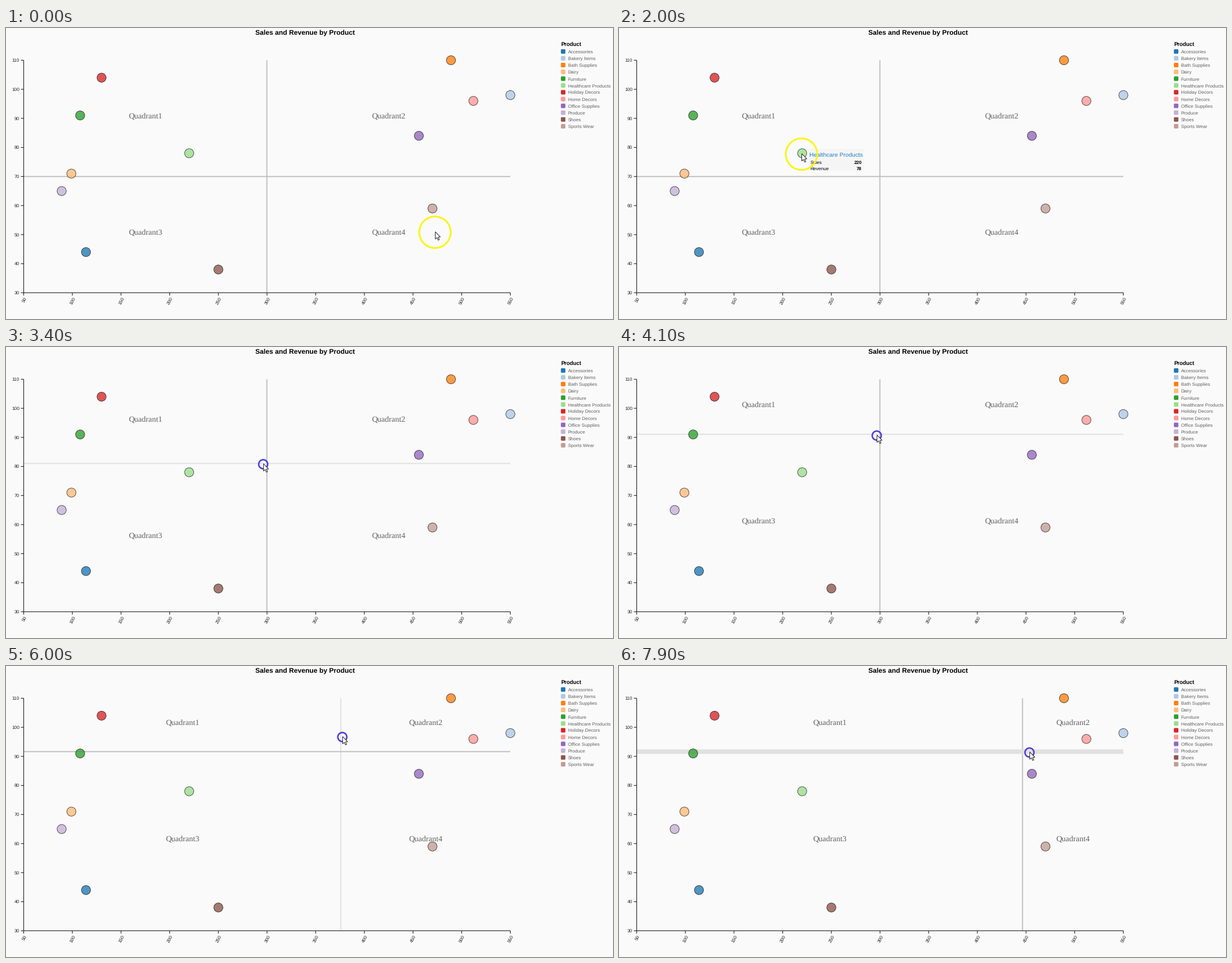
A matplotlib script that plays this animation: 1081x518 px, repeating every 8 s.

```python
import numpy as np
import matplotlib.pyplot as plt
from matplotlib.animation import FuncAnimation
from matplotlib.patches import Circle, FancyBboxPatch, Polygon, Rectangle

plt.rcParams["text.hinting"] = "none"

W, H, DPI = 1081, 518, 100
FRAMES, STEP = 80, 100
PX = 72 / DPI
LEFT, RIGHT, TOP, BOTTOM = 31.5, 898.2, 57.4, 471.3
INK, TEXT, GREY, PALE = "#222222", "#606060", "#bdbdbd", "#e0e0e0"
YELLOW, BLUE = "#fbf50c", "#4b40dc"

PRODUCTS = [
    ("Accessories", 114, 44), ("Bakery Items", 550, 98),
    ("Bath Supplies", 489, 110), ("Dairy", 99, 71),
    ("Furniture", 108, 91), ("Healthcare Products", 220, 78),
    ("Holiday Decors", 130, 104), ("Home Decors", 512, 96),
    ("Office Supplies", 456, 84), ("Produce", 89, 65),
    ("Shoes", 250, 38), ("Sports Wear", 470, 59),
]
COLORS = plt.get_cmap("tab20").colors

# Pointer stops: arrive, leave, x, y
STOPS = [
    (0, 0, 764, 363), (4, 5, 905, 118), (7, 7, 520, 68), (9, 11, 168, 88),
    (19, 20, 325, 224), (24, 24, 410, 335), (27, 30, 457, 266.4),
    (43, 48, 459, 154.4), (50, 55, 465, 139), (71, 74, 719, 114),
    (78, FRAMES, 731, 153.4),
]
# Button down and up
H_DRAG, V_DRAG, LAST_PRESS = (30, 48), (55, 73), (78, FRAMES)
LAG = .1


def sx(v):
    return LEFT + (v - 50) / 500 * (RIGHT - LEFT)


def sy(v):
    return BOTTOM - (v - 30) / 80 * (BOTTOM - TOP)


POINTS = np.array([(sx(s), sy(r)) for _, s, r in PRODUCTS])


def pointer(i):
    """Rest at each stop, then ease out towards the next one."""
    for (_, leave, *a), (arrive, _, *b) in zip(STOPS, STOPS[1:]):
        if i < arrive:
            t = max(0, (i - leave) / (arrive - leave))
            return np.array(a) + (1 - (1 - t) ** 2) * np.subtract(b, a)
    return np.array(STOPS[-1][2:], float)


def dragged(i, span):
    return pointer(np.clip(i - LAG, *span))


def inside(i, span):
    return span[0] <= i < span[1]


fig = plt.figure(figsize=((W + .001) / DPI, (H + .001) / DPI), dpi=DPI,
                 facecolor="#fafafa")
ax = fig.add_axes([0, 0, 1, 1])
ax.set_xlim(0, W)
ax.set_ylim(H, 0)
ax.axis("off")


def label(x, y, s, size, color=INK, font="Liberation Sans", **kw):
    return ax.text(x, y, s, fontsize=size * PX, color=color, family=font, **kw)


def line(xs, ys, color=INK, width=1.15, z=3):
    return ax.plot(xs, ys, color=color, lw=width * PX, zorder=z, snap=False,
                   solid_capstyle="butt")[0]


def draw_axes():
    line([LEFT, LEFT], [TOP, BOTTOM + .5])
    line([LEFT, RIGHT], [BOTTOM, BOTTOM])
    for v in range(30, 111, 10):
        line([LEFT - 5, LEFT], [sy(v)] * 2)
        label(24.2, sy(v) + 2.8, str(v), 8.33, ha="right")
    for v in range(50, 551, 50):
        line([sx(v)] * 2, [BOTTOM, BOTTOM + 5])
        label(sx(v) + 4, 480, str(v), 8.33, ha="right", va="center",
              rotation=62, rotation_mode="anchor")


def draw_legend():
    label(988.3, 31.5, "Product", 9.7, "black", weight="bold")
    for k, (name, _, _) in enumerate(PRODUCTS):
        y = 41.8 + 12.1 * k
        ax.add_patch(FancyBboxPatch(
            (989.5, y - 2.7), 5.4, 5.4, lw=0, facecolor=COLORS[k],
            boxstyle="round,pad=1.3,rounding_size=1.6"))
        label(1000.5, y + 3.4, name, 8.33, TEXT)


def draw_points():
    for spot, color in zip(POINTS, COLORS):
        ax.add_patch(Circle(spot, 8.1, facecolor=(*color, .78),
                            edgecolor=(0, 0, 0, .7), lw=.9 * PX, zorder=5))


label(532.5, 13, "Sales and Revenue by Product", 12.1, "black",
      weight="bold", ha="center")
draw_axes()
draw_legend()
draw_points()

v_line = line([0, 0], [TOP, BOTTOM], z=2)
h_line = line([LEFT, RIGHT], [0, 0], z=2)
quads = [label(0, 0, f"Quadrant{k + 1}", 14.3, TEXT, "Liberation Serif",
               ha="center", zorder=4) for k in range(4)]

tip_box = ax.add_patch(Rectangle((0, 0), 0, 39, color="#f5f5f5", lw=0, zorder=6))
tip_name = label(0, 0, "", 10.5, "#1f7fc4", zorder=7)
tip_keys = [label(0, 0, s, 8.33, "black", zorder=7) for s in ("Sales", "Revenue")]
tip_vals = [label(0, 0, "", 8.33, "black", weight="bold", ha="right", zorder=7)
            for _ in range(2)]

ring = ax.add_patch(Circle((0, 0), 28, fill=False, zorder=8))
ARROW = np.array([(0, 0), (0, 13), (3, 10.4), (5.2, 15), (7.2, 14.1),
                  (5.1, 9.6), (9, 9.3)])
arrow = ax.add_patch(Polygon(ARROW, facecolor="white", edgecolor=INK,
                             lw=PX, zorder=9))


def style_split(item, dragging, gap):
    """Thin grey at rest, pale while dragged, a wide band under the pointer."""
    hover = abs(gap) < 5 and not dragging
    item.set_color(PALE if hover or dragging else GREY)
    item.set_linewidth((8 if hover else 1.9) * PX)


def draw_split(i, x, y):
    px = dragged(i, V_DRAG)[0] - .4
    py = dragged(i, H_DRAG)[1] - 2
    v_line.set_xdata([px, px])
    h_line.set_ydata([py, py])
    style_split(v_line, inside(i, V_DRAG), x - px)
    style_split(h_line, inside(i, H_DRAG), y - py)
    for k, q in enumerate(quads):
        cx = (px + (RIGHT if k % 2 else LEFT)) / 2 + .5
        cy = (py + (BOTTOM if k > 1 else TOP)) / 2 + .3
        q.set_position((cx, cy))


def draw_tip(x, y):
    gaps = np.hypot(*(POINTS - (x, y)).T)
    hit = gaps.argmin()
    shown = gaps[hit] < 8
    for item in (tip_box, tip_name, *tip_keys, *tip_vals):
        item.set_visible(shown)
    if not shown:
        return
    name, *values = PRODUCTS[hit]
    tip_name.set_text(name)
    tip_name.set_position((x + 13.5, y + 5))
    width = max(70, tip_name.get_window_extent().width + 4)
    tip_box.set_xy((x + 12, y - 8.5))
    tip_box.set_width(width)
    for k in range(2):
        row = y + 18 + 10.5 * k
        tip_keys[k].set_position((x + 15.5, row))
        tip_vals[k].set_text(str(values[k]))
        tip_vals[k].set_position((x + 8 + width, row))


def draw_pointer(i, x, y):
    arrow.set_xy(ARROW + (x + .5, y - .3))
    center, radius, color, alpha, width = (x, y), 28, YELLOW, 1, 3
    for span in (H_DRAG, V_DRAG, LAST_PRESS):
        age = i - span[1]
        if inside(i, span):
            radius, color, width = 8, BLUE, 2.7
        elif 0 <= age < 3:
            center = pointer(span[1])
            radius, color, alpha = 8.5 + 2.5 * age, BLUE, .8 - .27 * age
    ring.set_center((center[0], center[1] + .6))
    ring.set_radius(radius)
    ring.set_edgecolor(color)
    ring.set_alpha(alpha)
    ring.set_linewidth(width * PX)


def update(i):
    x, y = pointer(i)
    draw_split(i, x, y)
    draw_tip(x, y)
    draw_pointer(i, x, y)
    return []


anim = FuncAnimation(fig, update, frames=FRAMES, interval=STEP,
                     init_func=lambda: update(0), repeat=True, repeat_delay=0)
plt.show()
```
